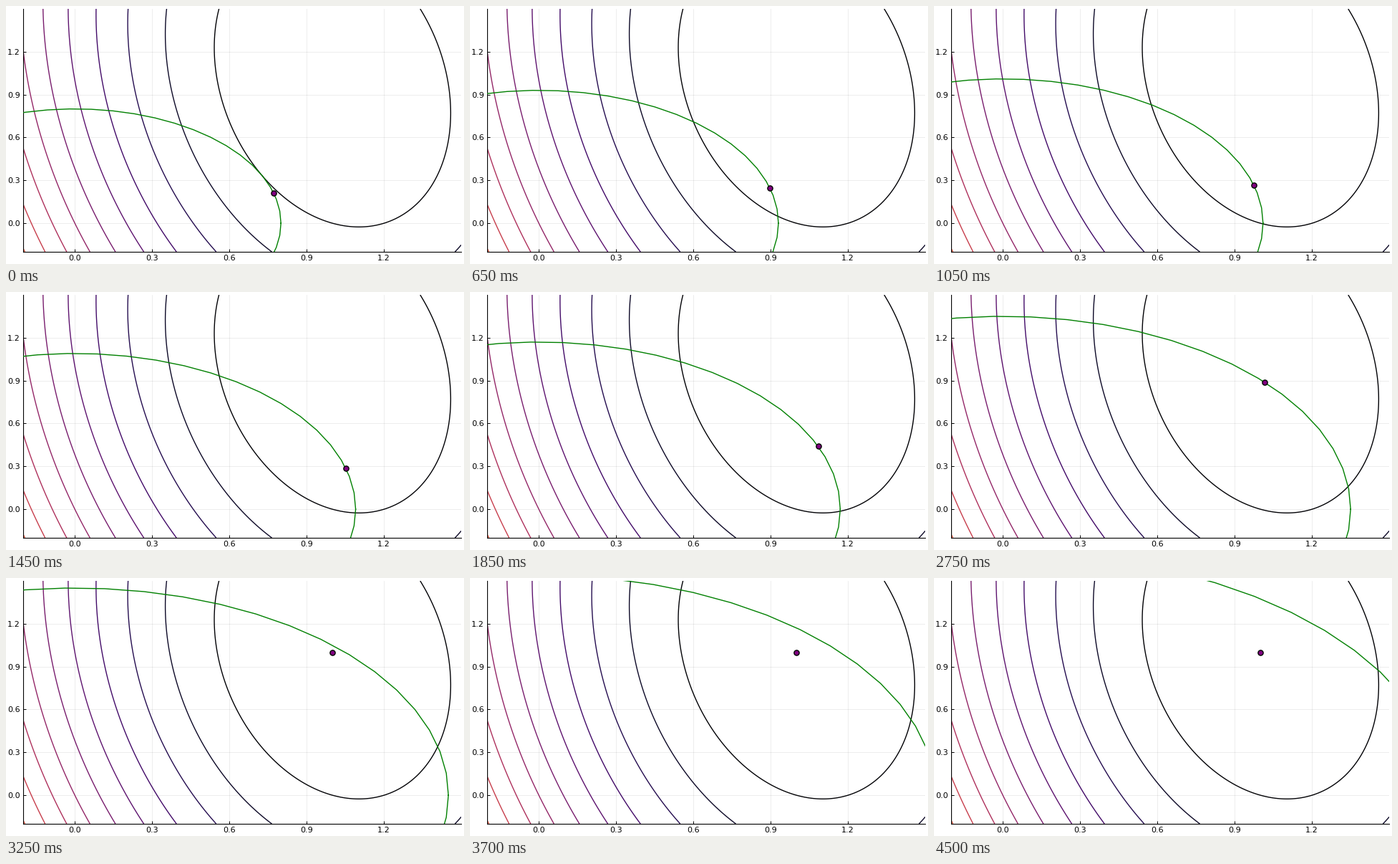
Animation of 640x360 px, one loop 4.55 s. Source, as a matplotlib script:

```python
import numpy as np
import matplotlib.pyplot as plt
from matplotlib.animation import FuncAnimation

W, H, DPI = 640, 360, 100
FRAMES, INTERVAL = 91, 50
LO, HI = -0.2, 1.5
LEFT, RIGHT, TOP, BOTTOM = 24.2, 636.2, 4, 343
LINE = 1.0

plt.rcParams["font.family"] = "DejaVu Sans"

# Quadratic model around the origin: g.p + p.B.p / 2, minimum at (1, 1)
B = np.array([[10.0, 1.0], [1.0, 2.0]])
newton = np.array([1.0, 1.0])
g = -B @ newton
cauchy = -g * (g @ g) / (g @ B @ g)


def dogleg(radius):
    """Step of the dogleg method for a trust region of this radius."""
    if np.linalg.norm(newton) <= radius:
        return newton
    length = np.linalg.norm(cauchy)
    if length >= radius:
        return cauchy * radius / length
    leg = newton - cauchy
    a, b, c = leg @ leg, cauchy @ leg, cauchy @ cauchy - radius**2
    return cauchy + leg * (-b + np.sqrt(b * b - a * c)) / a


fig = plt.figure(figsize=(W / DPI, H / DPI), dpi=DPI, facecolor="white")
ax = fig.add_axes([LEFT / W, 1 - BOTTOM / H, (RIGHT - LEFT) / W, (BOTTOM - TOP) / H])
ax.set_xlim(LO, HI)
ax.set_ylim(LO, HI)

ticks = np.arange(5) * 0.3
labels = [f"{t:.1f}" for t in ticks]
ax.set_xticks(ticks, labels)
ax.set_yticks(ticks, labels)
ax.tick_params(direction="in", length=3, width=0.7, labelsize=8, pad=3)
ax.grid(color="black", alpha=0.1, linewidth=0.5)
ax.set_axisbelow(True)
ax.spines[["top", "right"]].set_visible(False)
ax.spines[["left", "bottom"]].set_linewidth(0.8)

axis = np.linspace(LO, HI, 200)
x, y = np.meshgrid(axis, axis)
dx, dy = x - 1, y - 1
z = 5 * dx**2 + dx * dy + dy**2
ax.contour(x, y, z, levels=np.arange(1, 11), cmap="inferno", vmin=1, vmax=16,
           linewidths=LINE, zorder=2.1)

angle = np.linspace(0, 2 * np.pi, 60)
circle, = ax.plot([], [], color="green", linewidth=LINE, zorder=3)
dot, = ax.plot([], [], "o", markersize=5.2, markerfacecolor="purple",
               markeredgecolor="black", markeredgewidth=LINE, zorder=4)


def draw(frame):
    radius = 0.8 + 0.01 * frame
    circle.set_data(radius * np.cos(angle), radius * np.sin(angle))
    px, py = dogleg(radius)
    dot.set_data([px], [py])
    return circle, dot


anim = FuncAnimation(fig, draw, frames=FRAMES, interval=INTERVAL,
                     repeat=True, repeat_delay=0)
plt.show()
```
